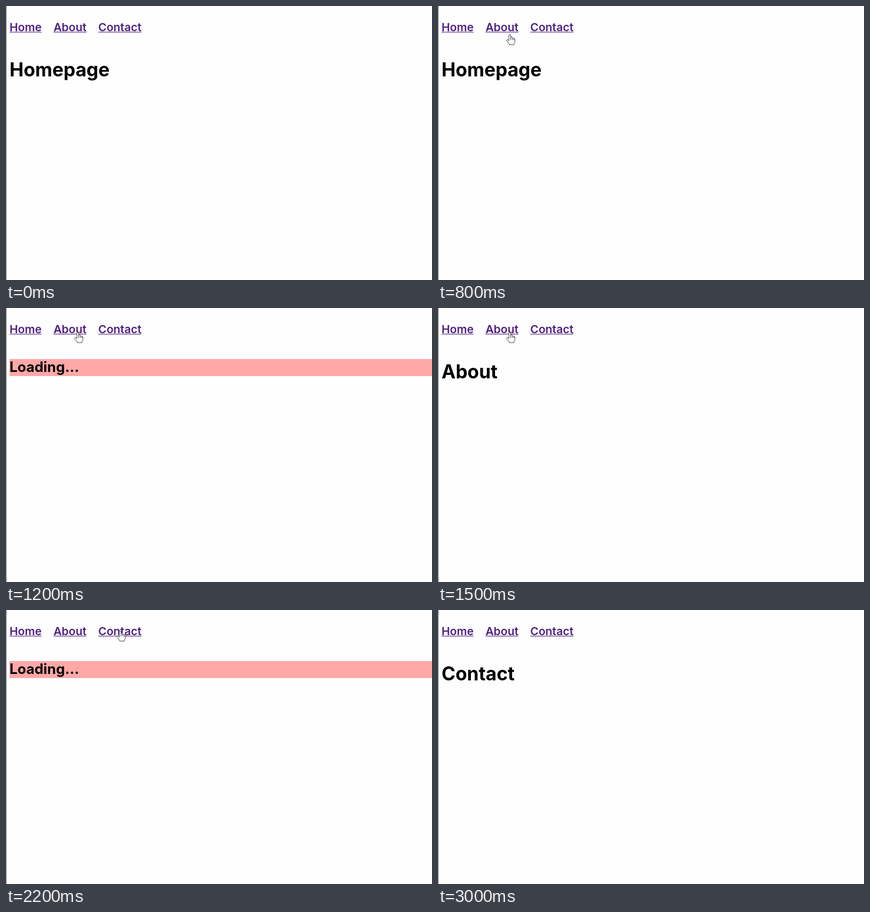
An HTML page for the animation above (3.4 s loop, 724 by 467 pixels).

```html
<!DOCTYPE html>
<html lang="en">
<head>
<meta charset="utf-8">
<title>Page navigation</title>
<style>
  html, body { margin: 0; width: 100%; height: 100%; overflow: hidden; background: #fefefe; }
  body { position: relative; font-family: Inter, sans-serif; font-weight: 700; color: #000; }
  body::before { content: ""; position: absolute; left: 0; top: 0; width: 1px; height: 100%; background: #858585; }
  nav { position: absolute; left: 6px; top: 25px; display: flex; gap: 20px; font-size: 19.2px; font-weight: 600; line-height: 23px; }
  nav span { color: #4f2080; text-decoration: underline; }
  nav .active { color: #e00d0d; }
  #heading { position: absolute; left: 6px; right: 0; top: 89px; font-size: 32px; line-height: 39px; }
  #heading.loading { top: 87px; font-size: 24px; line-height: 28.5px; background: #ffa8a8; }
  svg { position: absolute; left: 0; top: 0; width: 100%; height: 100%; }
  path { fill: #fff; stroke: #4b4b55; stroke-width: 1; stroke-linejoin: round; stroke-linecap: round; }
</style>
</head>
<body>
<nav><span>Home</span><span>About</span><span>Contact</span></nav>
<div id="heading"></div>
<svg>
  <g id="cursor">
    <path id="arrow" d="M0 0V15L3.6 11.7L6 17L8.3 16L6 10.9H10.8Z"/>
    <g id="hand">
      <path d="M-1.5 10V1Q-1.5-.5 0-.5T1.5 1V5.5Q3-.3 4.3 5.8Q6 4.6 6.8 6.6Q8.7 5.8 8.7 8V11.5Q8.7 14 7 15.3V17H-1V15.5L-5 10.5Q-6 8.6-4.5 8.2Q-3.2 8-1.5 10Z"/>
      <path d="M1.5 5.5V8.5M4.3 5.8V8.8M6.8 6.6V9" fill="none"/>
    </g>
  </g>
</svg>
<script>
const LOOP = 3400, STEP = 100;
const byId = id => document.getElementById(id);
const heading = byId("heading"), cursor = byId("cursor");
const links = [...document.querySelectorAll("nav span")];

const progress = (t, from, to) => Math.min(1, Math.max(0, (t - from) / (to - from)));
const easeOut = p => 1 - (1 - p) ** 2;
const smooth = p => p * p * (3 - 2 * p);
const mix = (a, b, p) => a.map((v, i) => v + (b[i] - v) * p);

const ENTRY = [363, 449], BELOW = [122, 49], ABOUT = [122, 42], CONTACT = [194, 36], EXIT = [408, 756];

function pointerAt(t) {
  if (t < 100 || t >= 3000) return null;
  if (t < 800) return mix(ENTRY, BELOW, easeOut(progress(t, 100, 800)));
  if (t < 1600) return mix(BELOW, ABOUT, smooth(progress(t, 800, 1100)));
  if (t < 2700) return mix(ABOUT, CONTACT, smooth(progress(t, 1600, 2100)));
  return mix(CONTACT, EXIT, progress(t, 2700, 3000) ** 2);
}

function titleAt(t) {
  if (t < 1200) return "Homepage";
  if (t < 1500 || (t >= 2200 && t < 2500)) return "Loading...";
  return t < 2200 ? "About" : "Contact";
}

function overLink([x, y]) {
  return links.some(link => {
    const box = link.getBoundingClientRect();
    return x >= box.left && x <= box.right && y >= box.top && y <= box.bottom + 1;
  });
}

function draw() {
  const t = Math.floor(performance.now() % LOOP / STEP) * STEP;
  const title = titleAt(t), point = pointerAt(t);
  heading.textContent = title;
  heading.className = title === "Loading..." ? "loading" : "";
  links[1].className = t === 1100 ? "active" : "";
  links[2].className = t === 2100 ? "active" : "";
  cursor.style.display = point ? "" : "none";
  if (point) {
    const [x, y] = point, hand = overLink(point);
    cursor.setAttribute("transform", `translate(${x} ${y})`);
    byId("hand").style.display = hand ? "" : "none";
    byId("arrow").style.display = hand ? "none" : "";
  }
  requestAnimationFrame(draw);
}
draw();
</script>
</body>
</html>
```
